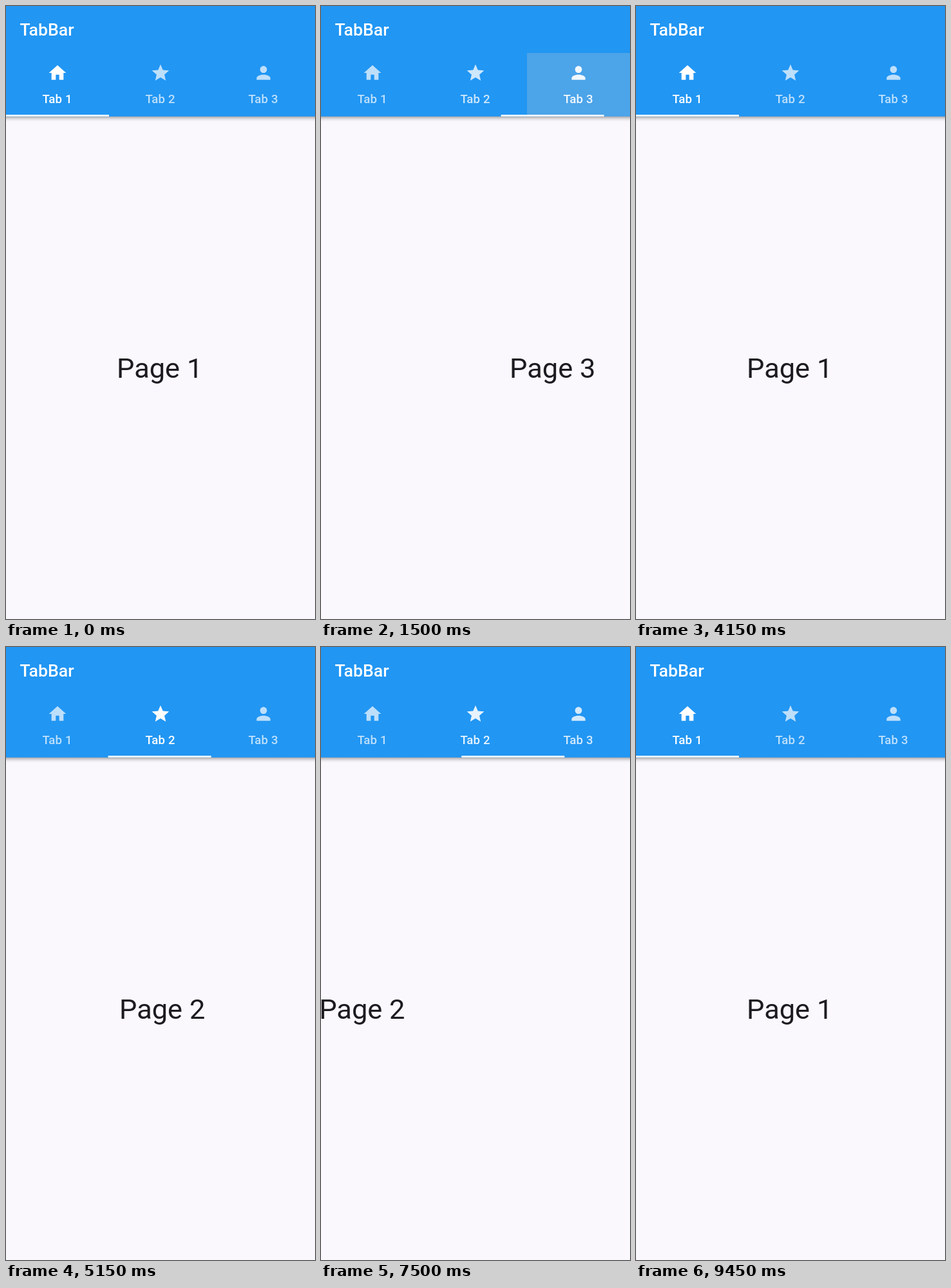
These frames come from a looping animation (480x953 px, 9500 ms). An HTML page:

```html
<!DOCTYPE html>
<html lang="en">
<head>
<meta charset="utf-8">
<title>TabBar</title>
<style>
  html, body { margin: 0; width: 100%; height: 100%; overflow: hidden; background: #faf8fc; }
  svg { display: block; width: 100%; height: 100%; }
  text { font-family: Roboto, sans-serif; }
  .title { font-size: 26.67px; font-weight: 500; fill: #fff; }
  .label { font-size: 18.67px; font-weight: 500; letter-spacing: .13px; text-anchor: middle; }
  .page { font-size: 43.4px; fill: #1c1b20; }
</style>
</head>
<body>
<svg id="stage" viewBox="0 0 480 953">
  <defs>
    <linearGradient id="shade" x1="0" y1="0" x2="0" y2="1">
      <stop offset="0" stop-opacity=".36"/>
      <stop offset=".3" stop-opacity=".2"/>
      <stop offset=".65" stop-opacity=".06"/>
      <stop offset="1" stop-opacity="0"/>
    </linearGradient>
    <clipPath id="cell"><rect id="cellBox" y="73" width="160" height="98.7"/></clipPath>
  </defs>
  <rect width="480" height="953" fill="#faf8fc"/>
  <g id="pages"></g>
  <rect y="171" width="480" height="9" fill="url(#shade)"/>
  <rect width="480" height="171.7" fill="#2196f3"/>
  <text class="title" x="21.5" y="46">TabBar</text>
  <g clip-path="url(#cell)" fill="#c8c8c8">
    <rect id="glow" y="73" width="160" height="98.7"/>
    <circle id="ripple" cy="122.3"/>
  </g>
  <g id="tabs" fill="#fff"></g>
  <rect id="bar" y="169" width="160" height="2.7" fill="#fff"/>
</svg>
<script>
const LOOP = 9500, STEP = 50, W = 480, TAB = 160;
const $ = id => document.getElementById(id);
const clamp = v => Math.min(1, Math.max(0, v));

const icons = [
  'M10 20v-6h4v6h5v-8h3L12 3 2 12h3v8z',
  'M12 17.27L18.18 21l-1.64-7.03L22 9.24l-7.19-.61L12 2 9.19 8.63 2 9.24l5.46 4.73L5.82 21z',
  'M12 12c2.21 0 4-1.79 4-4s-1.79-4-4-4-4 1.79-4 4 1.79 4 4 4zm0 2c-2.67 0-8 1.34-8 4v2h16v-2c0-2.66-5.33-4-8-4z'
];
$('tabs').innerHTML = icons.map((d, i) => `<g>
  <path d="${d}" transform="translate(${64 + TAB * i} 88) scale(1.3333)"/>
  <text class="label" x="${79.6 + TAB * i}" y="150.5">Tab ${i + 1}</text></g>`).join('');
$('pages').innerHTML = icons.map((d, i) =>
  `<text class="page" x="172" y="577.5">Page ${i + 1}</text>`).join('');
const tabs = [...$('tabs').children], pages = [...$('pages').children];

// Finger down, finger up, tab before, tab after
const taps = [
  { down: 140, up: 281, from: 0, to: 1 },
  { down: 1140, up: 1365, from: 1, to: 2 },
  { down: 2431, up: 2431, from: 2, to: 1 },
  { down: 3583, up: 3583, from: 1, to: 0 }
];
// Drag start, release, share of the page dragged
const swipes = [
  { down: 4390, up: 4636, pull: .35, from: 0, to: 1 },
  { down: 5490, up: 6033, pull: .4, from: 1, to: 2 },
  { down: 6760, up: 7410, pull: .4, from: 2, to: 1 },
  { down: 8210, up: 8670, pull: .4, from: 1, to: 0 }
];

// cubic-bezier(.25, .1, .25, 1)
function ease(x) {
  if (x <= 0 || x >= 1) return clamp(x);
  const curve = (a, b, s) => 3 * a * s * (1 - s) ** 2 + 3 * b * s * s * (1 - s) + s ** 3;
  let lo = 0, hi = 1;
  for (let i = 0; i < 24; i++) {
    const mid = (lo + hi) / 2;
    if (curve(.25, .25, mid) < x) lo = mid; else hi = mid;
  }
  return curve(.1, 1, lo);
}

// Accelerating drag, then an overdamped spring to the page edge
function swipe({ down, up, pull }, t) {
  if (t < up) return pull * clamp((t - down) / (up - down)) ** 2;
  const slow = 9.07, fast = 22.04, s = (t - up) / 1000;
  const speed = 2000 * pull / (up - down), rest = 1 - pull;
  const a = (fast * rest - speed) / (fast - slow);
  const left = a * Math.exp(-slow * s) + (rest - a) * Math.exp(-fast * s);
  return left < .001 ? 1 : 1 - left;
}

function position(t) {
  let pos = 0;
  for (const m of [...taps, ...swipes]) {
    if (t < m.down) break;
    const p = m.pull ? swipe(m, t) : ease((t - m.up) / 300);
    pos = m.from + (m.to - m.from) * p;
  }
  return pos;
}

function ink(t) {
  const tap = taps.find(p => t >= p.down && t < p.up + 375);
  let glow = 0, alpha = 0, radius = 0;
  if (tap) {
    const { down, up, to } = tap, after = t - up;
    const held = Math.min(t, up) - down;
    glow = clamp(held / 200) * clamp(1 - after / 200);
    alpha = clamp((t - down) / 75) * clamp(1 - (after - 225) / 150);
    const grow = ease(clamp(held / 1000 + Math.max(0, after) / 225));
    radius = 28 + 71 * grow;
    $('cellBox').setAttribute('x', TAB * to);
    $('glow').setAttribute('x', TAB * to);
    $('ripple').setAttribute('cx', TAB * to + TAB / 2);
  }
  $('glow').setAttribute('opacity', .15 * glow);
  $('ripple').setAttribute('opacity', .22 * alpha);
  $('ripple').setAttribute('r', radius);
}

function draw(t) {
  const pos = position(t);
  pages.forEach((p, i) => p.setAttribute('transform', `translate(${(i - pos) * W} 0)`));
  tabs.forEach((g, i) => g.setAttribute('opacity', .7 + .3 * clamp(1 - Math.abs(i - pos))));
  $('bar').setAttribute('x', pos * TAB);
  ink(t);
}

const start = performance.now();
function tick() {
  const t = (performance.now() - start) % LOOP;
  draw(Math.floor(t / STEP) * STEP);
  requestAnimationFrame(tick);
}
tick();
</script>
</body>
</html>
```
